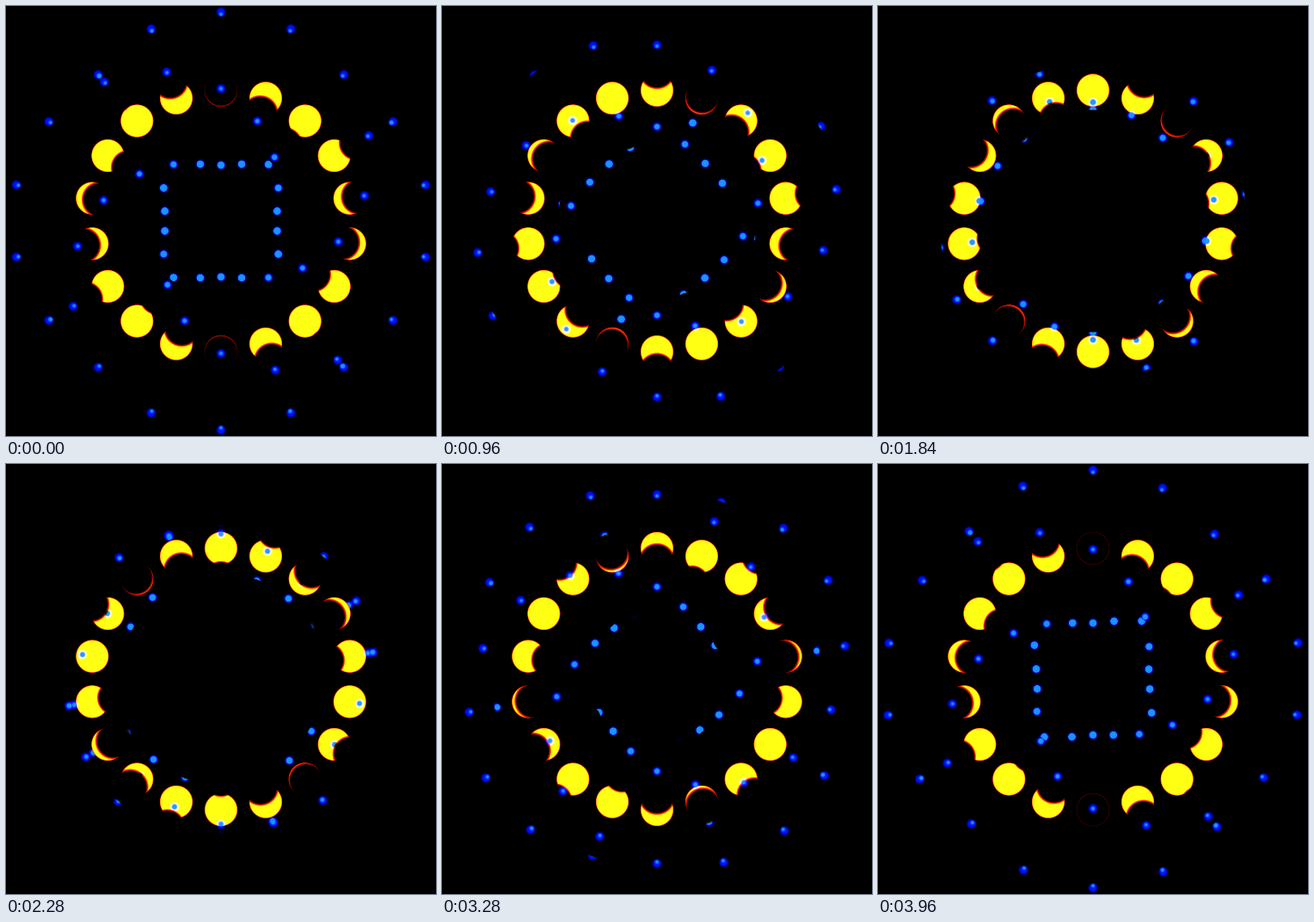
An HTML page with a canvas that plays this animation: 500 by 500 pixels, repeating every 4 s.

```html
<!DOCTYPE html>
<html lang="en">
<head>
<meta charset="utf-8">
<title>Ring of eclipses</title>
<style>
html, body { margin: 0; width: 100%; height: 100%; overflow: hidden; background: #000; }
canvas { display: block; width: 500px; height: 500px; }
</style>
</head>
<body>
<canvas id="stage" width="500" height="500"></canvas>
<script>
const ctx = document.getElementById('stage').getContext('2d');
const TAU = Math.PI * 2;
const LOOP = 4000, STEP = 40;
const SYSTEMS = 18, PLANETS = 4;
const RING = 152;      // distance of each sun from the centre
const ORBIT = 58;      // planet around its sun
const MOON_ORBIT = 31; // moon around its planet
const LEAN = 1;        // outward drift of each orbit's centre
const SUN_R = 19, PLANET_R = 18.3;

function glow(x, y, r, stops, mode = 'source-over') {
  const g = ctx.createRadialGradient(x, y, 0, x, y, r);
  for (const [at, color] of stops) g.addColorStop(Math.min(1, at / r), color);
  ctx.globalCompositeOperation = mode;
  ctx.fillStyle = g;
  ctx.beginPath();
  ctx.arc(x, y, r, 0, TAU);
  ctx.fill();
}

function drawSun() {
  glow(0, -RING, SUN_R + 0.6, [
    [0, '#ffff14'], [17.9, '#ffff14'], [18.6, '#ff8a08'],
    [19.1, 'rgba(235,30,0,.85)'], [19.6, 'rgba(120,0,0,0)']
  ]);
}

// The soft rim lets red light through first.
function drawPlanet({ out, z }) {
  const front = Math.max(0, z / ORBIT);
  const rim = 0.8 + 2.9 * front * front;
  glow(0, -RING - out, PLANET_R + rim, [
    [0, '#000'], [PLANET_R, '#000'], [PLANET_R + rim * 0.55, '#f01800'],
    [PLANET_R + rim * 0.8, '#ff9010'], [PLANET_R + rim, '#fff']
  ], 'multiply');
}

function drawMoon({ out, z }) {
  const y = -RING - out;
  const light = Math.max(0.15, Math.min(1, 0.65 - z / 220 - out / 170));
  glow(0, y, 6.4, [
    [0, 'rgb(0,20,255)'], [3.5, 'rgba(0,15,255,.95)'],
    [5, 'rgba(0,0,225,.6)'], [6.4, 'rgba(0,0,160,0)']
  ], 'lighter');
  const core = 3.2 + 1.5 * light;
  const shift = 2.5 * Math.max(0, out / 90);
  glow(0, y + shift, core, [
    [0, 'rgb(30,155,255)'], [core * (0.2 + 0.65 * light), 'rgba(25,145,255,.95)'],
    [core, 'rgba(10,80,255,0)']
  ]);
}

function drawSystem(phase, swing) {
  const bodies = [{ z: 0, draw: drawSun }];
  for (let i = 0; i < PLANETS; i++) {
    const a = phase + i * TAU / PLANETS;
    const out = LEAN + ORBIT * Math.sin(a), z = ORBIT * Math.cos(a);
    bodies.push({ out, z, draw: drawPlanet });
    bodies.push({
      out: out + LEAN + MOON_ORBIT * Math.sin(a + swing),
      z: z + MOON_ORBIT * Math.cos(a + swing),
      draw: drawMoon
    });
  }
  bodies.sort((a, b) => a.z - b.z).forEach(b => b.draw(b));
}

function render(time) {
  const u = Math.floor((time % LOOP) / STEP) * STEP / LOOP;
  ctx.setTransform(1, 0, 0, 1, 0, 0);
  ctx.globalCompositeOperation = 'source-over';
  ctx.fillStyle = '#000';
  ctx.fillRect(0, 0, 500, 500);
  for (let k = 0; k < SYSTEMS; k++) {
    const turn = k * TAU / SYSTEMS;
    ctx.setTransform(1, 0, 0, 1, 250, 250);
    ctx.rotate(turn);
    drawSystem(u * TAU / PLANETS - turn, u * TAU);
  }
}

const start = performance.now();
function tick() {
  render(performance.now() - start);
  requestAnimationFrame(tick);
}
tick();
</script>
</body>
</html>
```
